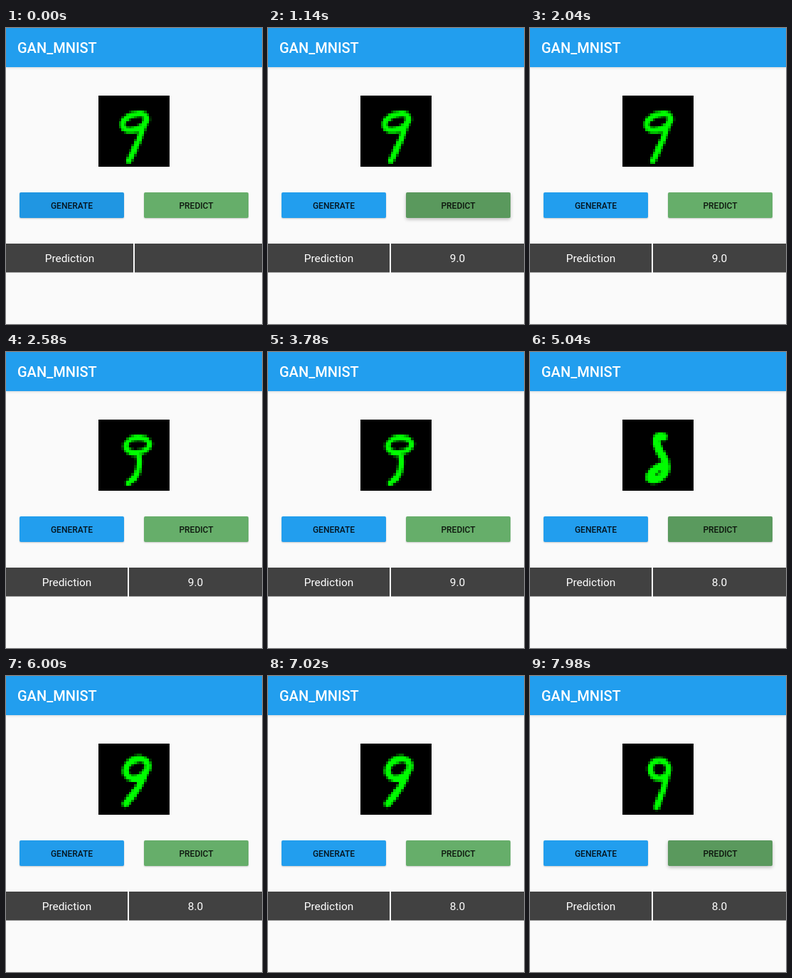
An HTML page with a canvas for the animation above (8000 ms loop, 360 by 416 pixels).

```html
<!DOCTYPE html>
<html lang="en">
<head>
<meta charset="utf-8">
<title>GAN_MNIST</title>
<style>
  html, body { margin: 0; width: 100%; height: 100%; overflow: hidden; background: #fafafa; }
  body { position: relative; font-family: Roboto, sans-serif; }
  header, canvas, .button, .cell { position: absolute; box-sizing: border-box; }
  header {
    left: 0; top: 0; width: 360px; height: 55px; padding-left: 16px;
    background: #229eee; color: #fff; font-size: 20px; font-weight: 500; line-height: 56px;
    box-shadow: 0 1px 3px rgba(0, 0, 0, .15);
  }
  canvas { left: 130px; top: 95px; width: 100px; height: 100px; background: #000; image-rendering: pixelated; }
  .button {
    top: 231px; width: 147px; height: 36px; border-radius: 2px; overflow: hidden;
    color: rgba(0, 0, 0, .87); font-size: 12px; font-weight: 500; line-height: 38px; text-align: center;
  }
  .button i { position: absolute; inset: 0; background: #000; opacity: 0; }
  .button span { position: relative; }
  #generate { left: 19px; background: #229eee; }
  #predict { left: 194px; background: #66ae6a; }
  .cell {
    top: 303px; height: 41px; border-bottom: 1px solid #9a9a9a; background: #414141; color: #fff;
    font-size: 15.4px; line-height: 42px; text-align: center;
  }
  #label { left: 0; width: 171px; }
  #result { left: 173px; right: 0; }
  .empty #label { width: 179px; }
  .empty #result { left: 181px; }
</style>
</head>
<body>
<header>GAN_MNIST</header>
<canvas id="digit" width="28" height="28"></canvas>
<div class="button" id="generate"><i></i><span>GENERATE</span></div>
<div class="button" id="predict"><i></i><span>PREDICT</span></div>
<div class="cell" id="label">Prediction</div>
<div class="cell" id="result"></div>
<script>
const LOOP = 8000, PRESS = 540, RESPONSE = 180;
const byId = id => document.getElementById(id);
const ramp = (t, from, to) => Math.min(1, Math.max(0, (t - from) / (to - from)));

// The two buttons are pressed in turn
const generateStarts = [-360, 2040, 4020, 5580, 7020];
const predictStarts = [900, 3300, 4740, 6420, 7860];
const results = ['', '9.0', '9.0', '8.0', '8.0'];

// A tilted loop with a curved tail, on a 100 px square
function nine(width, [x, y], [rx, ry], tilt, tail) {
  const path = new Path2D(tail);
  const loop = new Path2D();
  loop.ellipse(x, y, rx, ry, tilt * Math.PI / 180, 0, 2 * Math.PI);
  path.addPath(loop);
  return { width, path };
}

const digits = [
  nine(8.4, [51, 37], [18, 10.5], -20, 'M67 33Q59 60 43 92'),
  nine(8, [55, 36], [17, 10.5], -8, 'M56 46Q62 78 42 89'),
  { width: 11, path: new Path2D('M58 24Q46 20 48 34Q52 46 60 57Q66 76 50 83Q36 88 38 79Q44 70 56 64') },
  nine(9.6, [54, 35], [17, 12.5], -30, 'M67 38Q58 64 38 85'),
  nine(8.4, [52, 36], [13, 12.5], 0, 'M64 40Q58 66 48 89')
];

const pen = byId('digit').getContext('2d');
pen.scale(.28, .28);
pen.strokeStyle = '#00fc00';
pen.lineCap = pen.lineJoin = 'round';

function drawDigit({ width, path }) {
  pen.clearRect(0, 0, 100, 100);
  pen.lineWidth = width;
  pen.stroke(path);
}

function drawButton(id, starts, t) {
  const start = starts.filter(s => s <= t).pop() ?? -LOOP;
  const age = t - start;
  const tint = ramp(age, 0, 70) * (1 - ramp(age, 300, PRESS - 60)) ** 2;
  const lift = ramp(age, 20, 110) - ramp(age, 240, 300);
  const button = byId(id), ripple = button.firstChild;
  ripple.style.opacity = .12 * tint;
  ripple.style.clipPath = `circle(${20 + 60 * ramp(age, 0, 120)}px)`;
  button.style.boxShadow =
    `0 ${1 + lift}px ${2 + 3 * lift}px rgba(0, 0, 0, ${.2 + .06 * lift})`;
}

function frame(now) {
  const t = now % LOOP;
  const answered = starts => starts.filter(s => s + RESPONSE <= t).length;
  drawButton('generate', generateStarts, t);
  drawButton('predict', predictStarts, t);
  drawDigit(digits[answered(generateStarts) - 1]);

  const result = results[answered(predictStarts)] ?? results.at(-1);
  byId('result').textContent = result;
  document.body.classList.toggle('empty', !result);
  requestAnimationFrame(frame);
}
frame(0);
</script>
</body>
</html>
```
